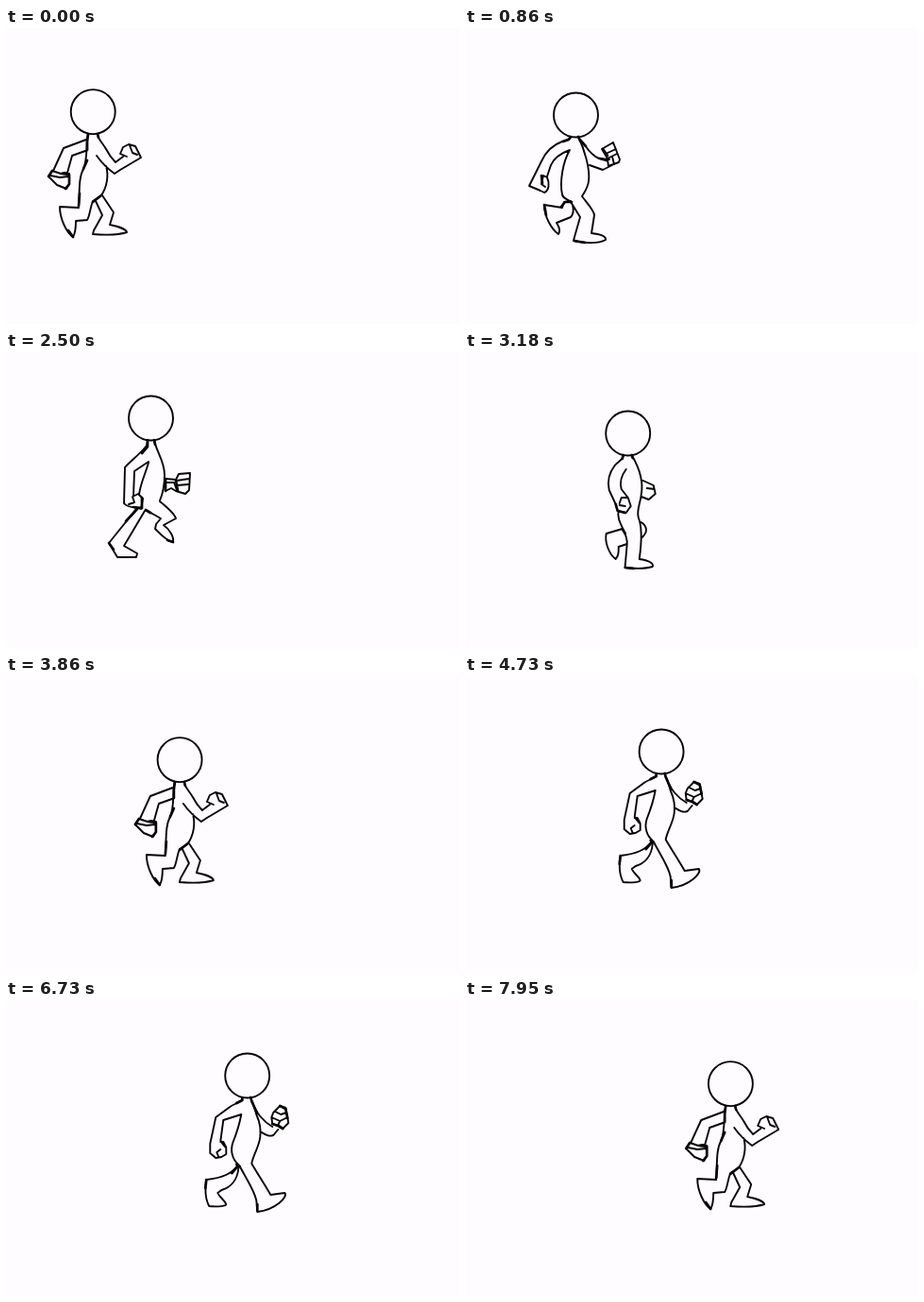
An HTML page with a canvas that plays this animation: 480x313 px, repeating every 8 s.

```html
<!DOCTYPE html>
<html lang="en">
<head>
<meta charset="utf-8">
<title>Walk cycle</title>
<style>
html, body { margin: 0; width: 100%; height: 100%; overflow: hidden; background: #fefcfe; }
canvas { display: block; width: 100%; height: 100%; }
</style>
</head>
<body>
<canvas id="stage" width="480" height="313"></canvas>
<script>
const LOOP = 8000;
const CYCLE = 1990;    // two steps, eight held drawings
const LEAD = 176;      // time already spent in the first drawing
const SPEED = 0.0238;  // px per ms
const HEAD_R = 23.5;
const PAPER = '#fefcfe';
const INK = '#050505';

const ctx = document.getElementById('stage').getContext('2d');

// x is the distance walked at which the drawing's coordinates hold
function pose(x, headX, headY, lines, bold) {
  return { x, headX, headY, lines: new Path2D(lines.join(' ')), bold: new Path2D(bold) };
}

const poses = [
  // down, far foot planted
  pose(0, 92.2, 88.6, [
    'M87 112 L86 117 C85 130 86 140 82 149 C77 158 78 171 77 189',
    'M77 190 L57 189 C57 202 64 216 71 221 C74 216 74 210 74 204 L86 203 C89 198 89 190 92 183',
    'M97 112 C97 117 102 121 106 128 C109 134 112 138 116 142 L124 136',
    'M96 135 C101 142 108 149 115 154 L121 150 L143 137 L137 125 L130 123 L124 126 L121 133 L128 136 M131 124 L134 132 L139 134',
    'M106 146 C109 156 107 168 101 177 L92 183',
    'M102 177 L114 195 L110 208 C119 210 127 212 128 216 C119 219 105 219 92 218 L93 214 L102 198 L95 183',
    'M85 118 L61 127 L50 151 M84 130 L70 135 L65 153',
    'M49 151 L45 157 L54 166 L64 170 L67 165 L67 154 L62 153 L58 154 L49 151 M47 156 L57 158 L66 157'
  ], 'M87 112 L86 120 L86 129 M97 112 L98 116 M92 184 L101 177 M49 151 L45 157 M63 170 L67 165 L67 155 L59 154 M71 221 L66 214 M77 188 L78 175 M86 140 L82 149'),

  // passing, near leg swings through
  pose(0, 95, 80, [
    'M91 103 C91 109 84 113 82 119 C79 130 86 141 89 148 L106 158',
    'M100 103 C107 116 112 126 110 139 M99 119 C98 130 102 139 113 143',
    'M106 157 L104 148 L113 143 L121 145 L124 154 L116 161 L106 158 M113 148 L122 149',
    'M82 119 L70 137 L73 153 M83 135 L81 147',
    'M73 153 L74 161 L81 163 L86 157 L82 147 L74 152',
    'M89 148 C84 157 83 165 86 174 L93 187',
    'M109 160 C107 166 117 177 114 186 L90 204',
    'M93 187 L75 191 C73 199 78 211 85 217 C90 212 89 207 90 204',
    'M110 190 L107 211 C116 212 122 214 122 217 C112 221 102 220 93 219 L94 215 L98 199'
  ], 'M91 103 L91 107 M100 103 L101 106 M106 157 L116 161 M93 187 L87 189 M114 186 L110 189'),

  // up, near knee forward
  pose(59.5, 153.5, 70, [
    'M150 93 L149 99 C140 110 132 115 126 122 L125 160',
    'M151 116 L136 126 L135 152 M151 117 C148 128 142 140 141 151',
    'M125 160 C130 166 137 163 143 166 L145 155 L140 150 L134 153 L136 159 M130 161 L136 159',
    'M157 93 C159 105 168 115 168 130 C168 142 166 150 163 157',
    'M169 134 L180 135 L183 129 L195 128 L194 146 L190 150 L180 147 L175 144 L169 147',
    'M181 136 L194 134 M181 141 L193 140 M169 138 L178 138 L181 146',
    'M163 158 C168 162 178 170 180 176 L167 183 C174 188 178 196 177 201 C170 200 163 192 158 187 L159 182 L164 176 L148 167',
    'M138 166 L109 202 L118 217 L138 217 L139 213 L125 205 L147 168'
  ], 'M150 93 L150 100 L144 107 M157 93 L158 98 M135 164 L144 165 L144 154 M139 166 L127 179 M169 134 L169 147 M180 136 L182 147 M177 201 L171 199 M109 202 L114 209 M148 167 L153 170'),

  // contact, near foot forward
  pose(112.9, 208.4, 80, [
    'M203 103 L203 106 C199 109 194 110 190 113 L175 124 L169 152 L169 162',
    'M202 121 L183 127 L180 149',
    'M169 162 L175 167 L181 166 L186 163 L186 156 L183 150 L180 150 M178 166 L176 161 L180 158',
    'M202 121 C200 132 197 141 193 151 C190 160 193 169 199 174',
    'M212 103 C213 108 216 113 218 121 C222 130 223 138 222 145 C221 155 214 165 213 173',
    'M213 173 C220 185 228 197 233 206 L248 204 C252 208 238 222 219 224 L218 212 C216 201 206 187 200 175',
    'M199 174 C192 184 182 188 165 190 C163 199 164 211 168 218 C177 219 186 218 186 216 C184 211 179 209 177 204 L181 201 C191 198 198 190 199 178',
    'M214 108 C217 119 226 129 235 134 M222 139 C227 142 231 145 236 143 L241 137',
    'M236 119 L243 112 L249 114 L252 130 L246 136 L241 132 L243 128 L234 124 L236 119 M234 124 L235 131 L241 133 M243 128 L251 124 M238 118 L244 121 L250 119'
  ], 'M203 103 L203 106 L197 109 M212 103 L213 107 L218 118 M197 174 L200 176 M165 190 L164 199 M219 223 L219 216 M243 112 L249 115 L251 125 M235 131 L241 133 L246 136 M181 150 L185 155 M198 176 L192 183'),

  // down, near foot planted
  pose(20.5, 117.5, 92, [
    'M112 115 C111 119 106 118 103 120 C92 124 85 132 81 141 L68 167 L80 172',
    'M111 129 C100 133 94 138 91 145 L87 157',
    'M80 172 L84 174 C89 172 90 164 87 158 L83 156 L81 165 L85 168',
    'M111 129 C104 141 100 162 103 176 C104 182 111 180 114 187',
    'M103 190 L84 187 C84 200 92 213 99 218 C102 213 99 209 97 206 L112 200 C116 196 115 191 114 187 M103 190 L105 184 L112 183',
    'M120 115 C126 127 133 149 131 162 C130 170 126 174 124 178',
    'M124 178 C130 186 137 193 137 198 L134 217 C143 218 150 220 149 224 C140 229 125 227 115 225 L116 221 L122 200 L114 187',
    'M121 117 C127 121 130 133 142 138 L153 139 M132 145 L146 150 L156 145',
    'M157 121 L145 128 L151 138 L161 133 M157 121 L164 139 L163 142 L152 146 L151 139 M149 133 L160 128 M156 136 L158 144'
  ], 'M112 115 L110 118 L104 120 M120 115 L122 119 L128 125 M84 187 L86 198 M102 189 L106 184 L113 184 M146 128 L151 135 M116 225 L127 227 M81 156 L82 164 M143 138 L150 140'),

  // passing, far leg swings through
  pose(0, 97, 86, [
    'M92 109 C92 114 86 116 83 120 C76 129 75 137 77 146 L84 161',
    'M95 124 C89 132 88 138 90 145 L97 154',
    'M84 161 L86 168 L95 170 L100 163 L97 154 L90 154 L88 160 M88 162 L94 163',
    'M101 109 C108 121 114 136 111 151 C110 161 106 166 108 175',
    'M113 136 L124 141 L126 150 L119 156 L111 153 M117 144 L125 145',
    'M87 168 C84 180 97 190 96 203 L94 226',
    'M108 175 C113 187 111 205 109 219 C119 220 125 224 123 227 C113 230 103 229 94 228 L94 224',
    'M91 187 L74 192 C72 201 77 214 84 219 C88 214 87 210 87 206 L96 203',
    'M111 180 C117 184 119 190 111 197'
  ], 'M92 109 L91 113 M101 109 L102 112 M84 161 L86 168 L94 170 M91 187 L94 192 M94 228 L103 229'),

  // up, far knee forward
  pose(0, 96, 71, [
    'M92 94 L91 103 C90 116 84 131 82 143 C81 151 83 157 82 162',
    'M101 94 C103 105 106 113 108 121 C109 127 112 132 116 135 L125 131',
    'M102 137 L114 148 L130 143',
    'M125 131 L128 124 L136 124 L139 137 L131 143 L125 138 L125 131 M128 130 L137 129 M128 136 L138 134',
    'M91 105 L73 119 L65 143 M88 119 L79 127 L76 146',
    'M65 143 L63 153 L70 160 L78 157 L79 148 L76 145 L65 144 M69 152 L77 153',
    'M103 138 C110 147 109 154 105 162',
    'M82 162 L54 203 L64 219 L82 218 L83 214 L70 206 L94 169 L105 162',
    'M105 162 L122 177 L111 184 C118 188 121 196 120 202 C113 201 106 194 102 188 L103 183 L107 177 L94 169'
  ], 'M92 94 L91 102 M101 94 L102 99 M54 203 L59 211 M94 169 L99 172 M114 148 L120 146 M70 160 L78 156'),

  // contact, far foot forward
  pose(0, 96, 80, [
    'M91 103 L90 111 C90 126 84 137 80 149 C77 158 80 166 82 174',
    'M101 103 C102 111 108 118 111 127 L118 136 L128 130',
    'M106 141 L117 149 L133 140',
    'M128 130 L129 120 L137 118 L142 131 L134 140 L127 135 L128 130 M130 126 L139 124 M131 132 L141 129',
    'M90 112 L66 124 L57 148 M88 125 L75 131 L70 150',
    'M57 147 L52 156 L59 165 L68 168 L72 162 L72 152 L58 149 M56 156 L71 157',
    'M105 139 C111 150 107 164 101 174',
    'M82 174 C77 187 66 192 53 195 C50 203 53 216 58 224 C66 224 74 222 75 219 C71 215 67 212 65 208 L69 206 C79 202 86 193 88 180 L101 174',
    'M101 174 C108 188 116 198 120 204 L134 202 C141 206 126 220 106 222 L106 214 C103 200 95 187 88 178'
  ], 'M91 103 L90 111 M101 103 L102 107 M53 195 L52 203 M88 179 L100 174 M106 221 L106 214 M68 168 L72 161')
];

function stroke(path, width) {
  ctx.lineWidth = width;
  ctx.stroke(path);
}

function draw(now) {
  const t = now % LOOP;
  const phase = ((t + LEAD) % CYCLE) / CYCLE;
  const p = poses[Math.floor(phase * poses.length)];

  ctx.setTransform(1, 0, 0, 1, 0, 0);
  ctx.fillStyle = PAPER;
  ctx.fillRect(0, 0, 480, 313);
  ctx.translate(SPEED * t - p.x, 0);
  ctx.strokeStyle = INK;
  ctx.lineCap = ctx.lineJoin = 'round';

  const head = new Path2D();
  head.arc(p.headX, p.headY, HEAD_R, 0, Math.PI * 2);
  stroke(head, 1.9);
  stroke(p.lines, 1.9);
  stroke(p.bold, 2.7);
  requestAnimationFrame(draw);
}
requestAnimationFrame(draw);
</script>
</body>
</html>
```
